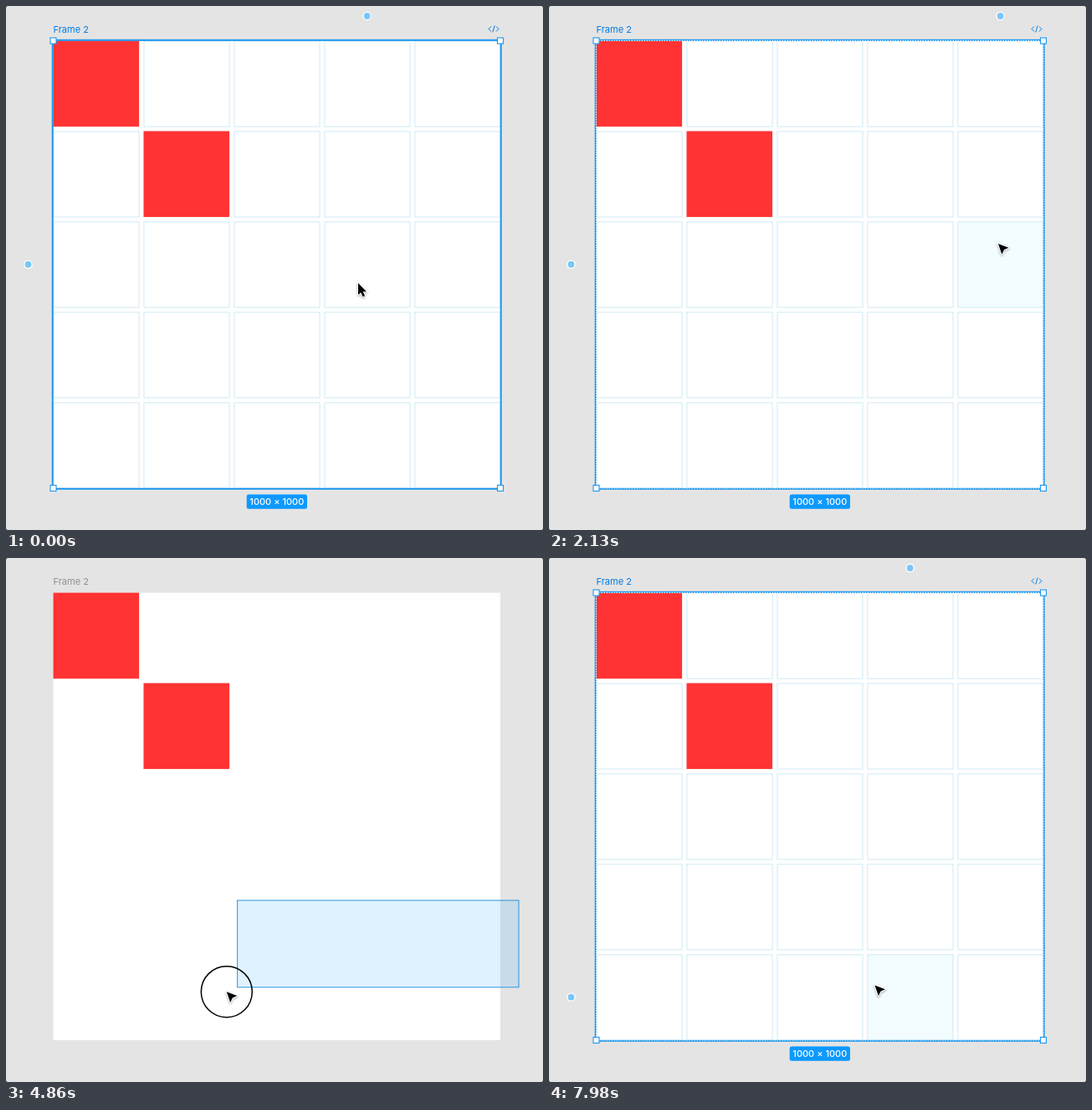
These frames come from a looping animation (642x626 px, 8000 ms). An HTML page with a canvas:

```html
<!DOCTYPE html>
<html lang="en">
<head>
<meta charset="utf-8">
<title>Selecting a grid frame</title>
<style>
html, body { margin: 0; width: 100%; height: 100%; overflow: hidden; background: #444; }
canvas { display: block; width: 642px; height: 626px; }
</style>
</head>
<body>
<canvas id="stage"></canvas>
<script>
const canvas = document.getElementById('stage');
const ctx = canvas.getContext('2d');
const dpr = window.devicePixelRatio || 1;
canvas.width = 642 * dpr;
canvas.height = 626 * dpr;

const LOOP = 8000, LAG = 20;
const LEFT = 56.5, TOP = 41.5, SIZE = 534.5, CELL = 102.6, PITCH = 107.97;
const BLUE = '#1a97ee', TEXT_BLUE = '#007be5';

// Pointer path: time, x, y
const path = [
  [0, 421, 331], [30, 421, 331], [300, 470, 318], [780, 562, 293], [1000, 562, 293],
  [1200, 480, 325], [1330, 430, 350], [1450, 457, 343], [1470, 463, 341],
  [1620, 537, 284], [2130, 537, 284], [2700, 609.5, 373.5], [3060, 609.5, 373.5],
  [3300, 330, 500], [3480, 130, 590], [3580, 98, 603], [3780, 98, 603],
  [3900, 119, 514.5], [3990, 119, 514.5], [4420, 613, 409], [4660, 613, 409],
  [4840, 277, 513], [4860, 264.5, 518], [5080, 90, 550], [5200, 77, 556],
  [5520, 77, 556], [5680, 330, 600], [5900, 620, 428], [6060, 620, 428],
  [6180, 500, 480], [6400, 180, 575], [6560, 100, 602], [6620, 100, 602],
  [6720, 115, 530], [7110, 115, 530], [7500, 330, 430], [7860, 389.5, 510.5],
  [8000, 389.5, 510.5]
];

const DRAG = [960, 1640];
const MARQUEES = [[2820, 3590], [4590, 5250], [5980, 6580]];
const CLICKS = [[3900, 3980], [5430, 5510], [6740, 6830]];
const PRESSES = [DRAG, ...MARQUEES, ...CLICKS];
const SELECTED = [[0, 960], [1640, 2820], [3980, 4590], [5510, 5980], [6830, 8000]];
const IDLE = [[0, 30], [1640, 2130], [7860, 7920]];

const during = (t, spans) => spans.find(([a, b]) => t >= a && t < b);

function slope(i, k) {
  return (path[i + 1][k] - path[i][k]) / (path[i + 1][0] - path[i][0]);
}

// Monotone tangent: zero at turning points and rests
function tangent(i, k) {
  if (i === 0 || i === path.length - 1) return 0;
  const a = slope(i - 1, k), b = slope(i, k);
  return a * b > 0 ? 2 * a * b / (a + b) : 0;
}

function pointer(t) {
  let i = 0;
  while (i < path.length - 2 && path[i + 1][0] <= t) i++;
  const d = path[i + 1][0] - path[i][0];
  const u = Math.max(0, t - path[i][0]) / d, v = 1 - u;
  return [1, 2].map(k =>
    path[i][k] * (1 + 2 * u) * v * v + path[i + 1][k] * u * u * (3 - 2 * u) +
    d * (tangent(i, k) * u * v * v - tangent(i + 1, k) * u * u * v));
}

function box(x, y, w, h, fill, stroke, width = 1) {
  if (fill) { ctx.fillStyle = fill; ctx.fillRect(x, y, w, h); }
  if (stroke) {
    ctx.strokeStyle = stroke;
    ctx.lineWidth = width;
    ctx.strokeRect(x, y, w, h);
  }
}

function label(text, x, y, color, weight = 400, align = 'left') {
  ctx.font = `${weight} 11px Inter, sans-serif`;
  ctx.textAlign = align;
  ctx.fillStyle = color;
  ctx.fillText(text, x, y);
}

function circle(x, y, r, fill, stroke, width) {
  ctx.beginPath();
  ctx.arc(x, y, r, 0, 7);
  if (fill) { ctx.fillStyle = fill; ctx.fill(); }
  if (stroke) { ctx.strokeStyle = stroke; ctx.lineWidth = width; ctx.stroke(); }
}

function frameOffset(t) {
  if (t < DRAG[0] || t >= 2130) return [0, 0];
  const [x, y] = pointer(Math.min(t, DRAG[1]) - (t < DRAG[1] ? LAG : 0));
  return [x - 562, y - 293];
}

const cellAt = v => Math.min(4, Math.floor((v + 2.7) / PITCH));

function drawGrid(col, row, inside, idle) {
  for (let i = 0; i < 25; i++) {
    const c = i % 5, r = Math.floor(i / 5);
    if (i === 0 || i === 6) continue;
    const hot = inside && !idle && c === col && r === row;
    box(LEFT + c * PITCH + .5, TOP + r * PITCH + .5, CELL - .5, CELL - .5,
      hot ? '#f3fcfe' : null, '#cfe9f6');
  }
}

function drawSelection(col, row, inside, idle) {
  if (inside && !idle) {
    ctx.setLineDash([1.5, 1.5]);
    box(LEFT, TOP, SIZE, SIZE, null, '#fff', 1);
    ctx.setLineDash([]);
  }
  for (const x of [LEFT, LEFT + SIZE])
    for (const y of [TOP, TOP + SIZE]) box(x - 3.5, y - 3.5, 7, 7, '#fff', BLUE, 1.1);

  if (inside) {
    const mid = n => n * PITCH + CELL / 2;
    circle(LEFT + mid(col), 12, 4.6, '#7ac6f8', '#fff', 1.4);
    circle(26.5, TOP + mid(row), 4.6, '#7ac6f8', '#fff', 1.4);
  }

  ctx.strokeStyle = TEXT_BLUE;
  ctx.lineWidth = 1;
  ctx.stroke(new Path2D('M580 24.5l-3 3l3 3M586 24.5l3 3l-3 3M584.2 23.5l-2.4 8'));

  ctx.fillStyle = '#0d99ff';
  ctx.beginPath();
  ctx.roundRect(287.7, 583.5, 72.3, 17.3, 2.5);
  ctx.fill();
  label('1000 × 1000', 323.8, 596.2, '#fff', 500, 'center');
}

const plainArrow = new Path2D('M0 0V14L3.2 11.2L5.7 16.4L8.1 15.3L5.7 10.2H10Z');
const sharpArrow = new Path2D('M0 0L12.5 4.8L7 7.2L4.4 12.8Z');

function drawPointer(x, y, shape) {
  ctx.save();
  ctx.translate(x, y);
  ctx.shadowColor = 'rgba(0,0,0,.35)';
  ctx.shadowBlur = 2.5 * dpr;
  ctx.shadowOffsetY = dpr;
  ctx.strokeStyle = '#fff';
  ctx.lineWidth = 2.2;
  ctx.lineJoin = 'round';
  ctx.stroke(shape);
  ctx.shadowColor = 'transparent';
  ctx.fillStyle = '#000';
  ctx.fill(shape);
  ctx.restore();
}

function draw(t) {
  const [x, y] = pointer(t);
  const [dx, dy] = frameOffset(t);
  const fx = x - dx - LEFT, fy = y - dy - TOP;
  const inside = fx >= 0 && fy >= 0 && fx <= SIZE && fy <= SIZE;
  const col = cellAt(fx), row = cellAt(fy);
  const selected = during(t, SELECTED), idle = during(t, IDLE);
  const dragging = during(t, [DRAG]), marquee = during(t, MARQUEES);
  const hover = inside && !dragging && !marquee;

  ctx.setTransform(dpr, 0, 0, dpr, 0, 0);
  ctx.clearRect(0, 0, 642, 626);
  ctx.fillStyle = '#e4e4e4';
  ctx.beginPath();
  ctx.roundRect(0, 0, 642, 626, 2.5);
  ctx.fill();

  ctx.save();
  ctx.translate(dx, dy);
  box(LEFT, TOP, SIZE, SIZE, '#fff');
  if (selected) drawGrid(col, row, inside, idle);
  for (const n of [0, 1]) box(LEFT + n * PITCH, TOP + n * PITCH, CELL, CELL, '#ff3333');
  const active = selected || hover || dragging;
  label('Frame 2', LEFT, 31.6, active ? TEXT_BLUE : '#8f8f8f');
  if (selected || hover) box(55.7, 40.8, SIZE + 1.5, SIZE + 1.5, null, BLUE, 2);
  if (selected) drawSelection(col, row, inside, idle);
  ctx.restore();

  if (marquee) {
    const [sx, sy] = pointer(marquee[0]);
    const [ex, ey] = pointer(t - LAG);
    if (Math.abs(ex - sx) > 2)
      box(ex + .5, ey - .5, sx - ex - .5, sy - ey + .5, 'rgba(13,153,255,.13)', '#2c96e0');
  }

  if (during(t, PRESSES)) circle(x, y, 30.5, null, '#000', 1.5);
  drawPointer(x, y, t < 30 ? plainArrow : sharpArrow);
}

const start = performance.now();
function tick(now) {
  draw(Math.max(0, now - start) % LOOP);
  requestAnimationFrame(tick);
}
draw(0);
requestAnimationFrame(tick);
</script>
</body>
</html>
```
